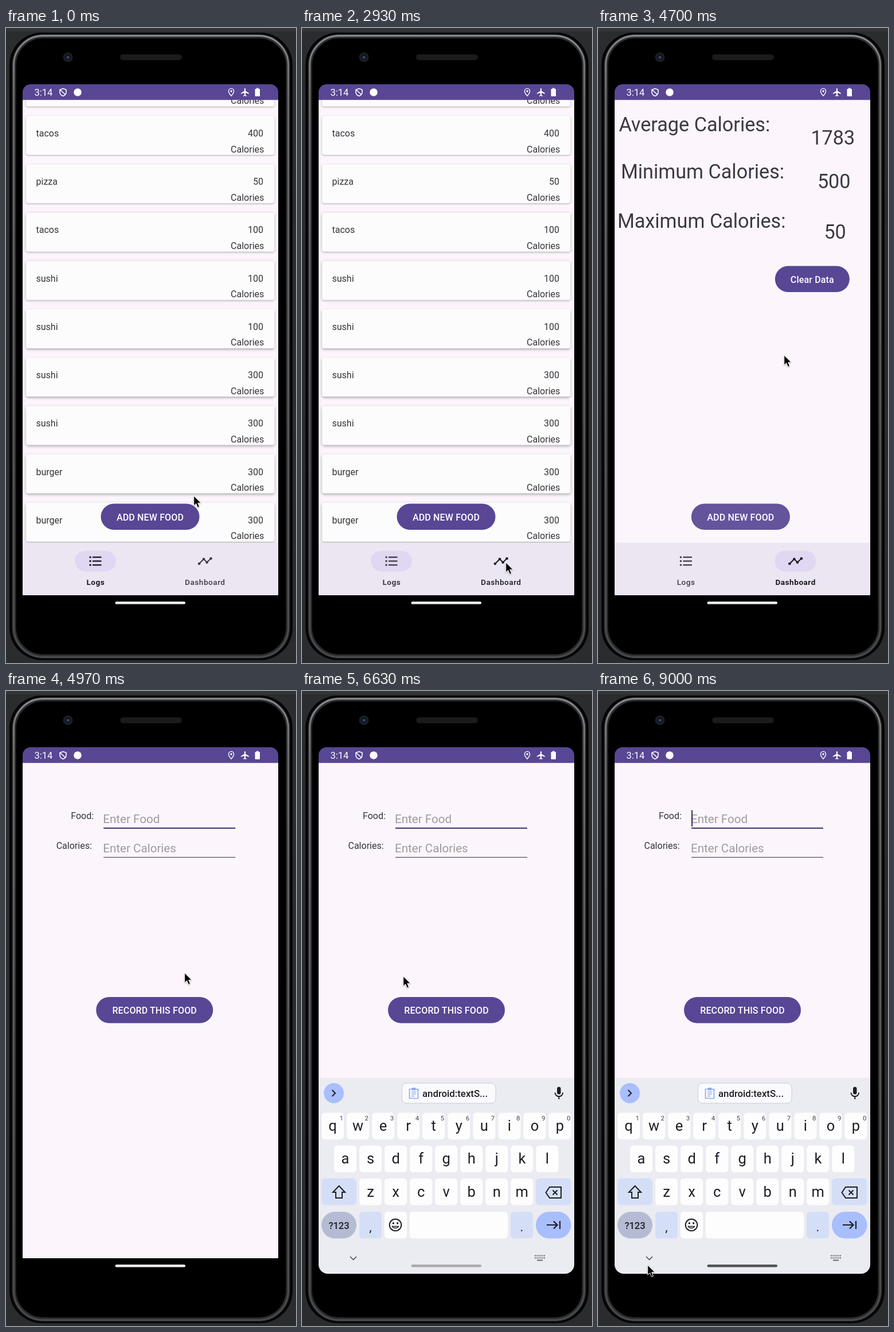
Write an HTML page that moves like this. It is 506 by 1106 pixels and loops after 9030 ms.

```html
<!DOCTYPE html>
<html lang="en">
<head>
<meta charset="utf-8">
<title>Food log</title>
<style>
html, body { margin: 0; width: 100%; height: 100%; overflow: hidden; background: #2b2c2e; }
svg { display: block; font-family: Roboto, "Noto Sans", sans-serif; }
</style>
</head>
<body>
<svg id="stage" width="506" height="1106" viewBox="0 0 506 1106"></svg>
<script>
const LOOP = 9030;
const PURPLE = '#594694', PAGE = '#fcf6fc', INK = '#36333a', ACTIVE = '#1a181d', IDLE = '#3f3c46';

// Markup helpers
const rect = (x, y, w, h, fill, r = 0, extra = '') =>
  `<rect x="${x}" y="${y}" width="${w}" height="${h}" rx="${r}" fill="${fill}" ${extra}/>`;
const dot = (x, y, r, fill, extra = '') => `<circle cx="${x}" cy="${y}" r="${r}" fill="${fill}" ${extra}/>`;
const text = (x, y, size, s, fill = INK, extra = '') =>
  `<text x="${x}" y="${y}" font-size="${size}" fill="${fill}" ${extra}>${s}</text>`;
const line = (d, color, w = 2, extra = '') =>
  `<path d="${d}" fill="none" stroke="${color}" stroke-width="${w}" ${extra}/>`;
const group = (id, body, extra = '') => `<g id="${id}" ${extra}>${body}</g>`;
const MID = 'text-anchor="middle"', END = 'text-anchor="end"', MEDIUM = 'font-weight="500"';

const button = (x, y, w, label, id = '') =>
  rect(x, y, w, 45.5, PURPLE, 22.7) +
  (id && rect(x, y, w, 45.5, '#fff', 22.7, `id="${id}" opacity="0"`)) +
  text(x + w / 2, y + 29, 16, label, '#fff', `${MID} ${MEDIUM} letter-spacing=".15"`);

function phone() {
  return rect(0, 0, 506, 1106, '#2b2c2e') + rect(0, 0, 506, 6, '#343538') +
    rect(6, 8, 494, 1093, '#050505', 56) +
    rect(14, 14.5, 478, 1080, '#000', 51, 'stroke="#2c2d2f" stroke-width="7"') +
    rect(13.5, 13.5, 479, 1082, 'none', 51, 'stroke="url(#rim)" stroke-width="2.8"') +
    dot(108, 51, 8.5, '#1d1e22') + dot(108, 51, 5, '#10131c') + dot(108, 51, 2.6, '#2b4274') +
    rect(199, 46, 108, 10, '#1b1b1b', 5);
}

function statusBar() {
  const plane = 'M22 16v-2l-8.5-5V3.5c0-.83-.67-1.5-1.5-1.5s-1.5.67-1.5 1.5V9L2 14v2l8.5-2.5V19L8 20.5V22l4-1 4 1v-1.5L13.5 19v-5.5z';
  return rect(29, 98, 446, 27.3, PURPLE) +
    text(49.5, 118, 16.5, '3:14', '#fff') +
    line('M99.5 105.5l5.5 2v4.5q0 4.5 -5.5 6.5q-5.5-2-5.5-6.5v-4.5zM95 108l8.5 8', '#fff', 1.6) +
    dot(125, 112, 6.8, '#fff') +
    line('M393 118.3q-4.6-5.3-4.6-8.3a4.6 4.6 0 0 1 9.2 0q0 3-4.6 8.3z', '#fff', 1.4) +
    dot(393, 110, 1.7, '#fff') +
    `<path d="${plane}" fill="#fff" transform="translate(408.5 103.5) scale(.7)"/>` +
    rect(434.5, 106, 8.5, 13, '#fff', 1) + rect(437, 104.5, 3.5, 2, '#fff');
}

function logs() {
  const foods = ['tacos', 'tacos', 'pizza', 'tacos', 'sushi', 'sushi', 'sushi', 'sushi', 'burger', 'burger'];
  const calories = [300, 400, 50, 100, 100, 100, 300, 300, 300, 300];
  return foods.map((food, i) => {
    const y = 153 + 84.22 * (i - 1);
    const shadow = `style="filter:drop-shadow(0 ${1 + i * .2}px ${1.6 + i * .12}px rgba(40,30,50,.38))"`;
    return rect(35, y, 433.5, 68, '#fcfcfc', 4, shadow) +
      text(52.5, y + 36, 16, food) +
      text(449, y + 36, 16, calories[i], INK, END) +
      text(450.3, y + 63.5, 16, 'Calories', INK, END);
  }).join('');
}

function dashboard() {
  const big = (x, y, s) => text(x, y, 34.2, s, '#3d3943');
  return big(39, 180, 'Average Calories:') + big(374, 203, '1783') +
    big(42.5, 262, 'Minimum Calories:') + big(385.5, 279, '500') +
    big(36.5, 348, 'Maximum Calories:') + big(397, 367, '50') +
    button(311.5, 414.5, 130, 'Clear Data');
}

function tabs() {
  const points = [[337, 933], [345, 925], [350.6, 930.7], [357.5, 924]];
  const list = [0, 1, 2].map(i => {
    const y = 921.7 + i * 6.8;
    return dot(147, y, 1.7, 'currentColor') + rect(151, y - 1.15, 15.5, 2.3, 'currentColor');
  }).join('');
  const chart = line('M' + points.join('L'), 'currentColor', 2) +
    points.map(p => dot(...p, 2.3, 'currentColor')).join('');
  const tab = (n, x, label, icon) =>
    rect(-36, 910.5, 72, 36, '#e0d8f3', 18, `id="pill${n}"`) +
    group('tab' + n, icon + text(x + .3, 969.5, 13.6, label, 'currentColor', `${MID} letter-spacing=".5"`));
  return tab(0, 156, 'Logs', list) + tab(1, 347, 'Dashboard', chart);
}

function form() {
  return rect(-30, 125, 570, 863, PAGE) +
    text(106, 223, 16, 'Food:') + text(80.5, 274.5, 16, 'Calories:') +
    text(162, 230, 20.6, 'Enter Food', '#9e9aa0', 'id="hint"') +
    text(162, 281, 20.6, 'Enter Calories', '#9e9aa0') +
    rect(163, 237.7, 230, 2.4, '#57477f') + rect(163, 289, 230, 1.3, '#5b5660') +
    rect(162.8, 207.5, 2.3, 28.5, '#4b4168', 0, 'id="caret"') +
    button(150, 533, 204, 'RECORD THIS FOOD');
}

function keyboard() {
  const dark = '#1d1e24', blue = '#a9befc', pale = '#d4dff7', pitch = 44.05;
  const key = (x, y, w = 39, fill = '#fdfdfe', r = 6) => rect(x, y, w, 46.5, fill, r);
  const row = (letters, x, y) => [...letters].map((c, i) =>
    key(x + i * pitch, y) + text(x + 19.5 + i * pitch, y + 31.5, 25.5, c, dark, MID)).join('');
  const digits = [...'1234567890'].map((d, i) => text(68.8 + i * pitch, 747.5, 11.5, d, '#45464d', MID)).join('');
  return rect(29, 674, 446, 342, '#ebebf2') +
    dot(55.5, 700.5, 17.5, blue) + line('M52.5 695l5.5 5.5l-5.5 5.5', dark) +
    rect(174.5, 683, 163.5, 35, '#fafafd', 8, 'stroke="#c9cad8"') +
    line('M187.5 693.5h15v16h-15zM191 698.5h8M191 702h8M191 705.5h5', '#8eaaf3', 1.7) +
    rect(191.5, 691, 7, 4.5, '#8eaaf3', 1) +
    text(210, 707, 16.8, 'android:textS...', dark, MEDIUM) +
    rect(445, 689.5, 6.5, 13, dark, 3.2) +
    line('M441.5 699.5a6.8 6.8 0 0 0 13.6 0M448.3 706v5', dark) +
    row('qwertyuiop', 34, 734.5) + digits + row('asdfghjkl', 56, 791.7) + row('zxcvbnm', 100, 849) +
    key(34, 849, 61, pale) + line('M64.5 862l10.5 11h-5v10h-11v-10h-5z', dark, 2) +
    key(408, 849, 61.5, pale) + line('M425.5 873.5l6.5-9.5h20v19h-20zM437.5 869.5l8 8m0-8l-8 8', dark, 2) +
    key(34, 907, 61, '#b4bbd3', 23) + text(64.5, 937, 16.5, '?123', dark, `${MID} ${MEDIUM}`) +
    key(100, 907, 39, pale) + text(119.5, 941, 22, ',', dark, MID) +
    key(144, 907) + dot(163, 930, 10.3, 'none', `stroke="${dark}" stroke-width="2"`) +
    dot(159.3, 927, 1.7, dark) + dot(166.7, 927, 1.7, dark) + line('M157.5 932.5a6 5 0 0 0 11 0z', dark, 1.5) +
    key(187.5, 907, 171.5) +
    key(364, 907, 39, pale) + text(383.5, 941, 22, '.', dark, MID) +
    key(408, 907, 61.5, blue, 23) + line('M427 930h18M439 923.5l6.5 6.5l-6.5 6.5M450 923v14', dark, 2.2) +
    line('M84 985l5.5 5.5l5.5-5.5', '#54555c', 1.7) +
    line('M406 983.5h18M406 987.5h18', '#6b6c73', 2, 'stroke-dasharray="2 1.2"') + line('M410 991.5h10', '#6b6c73', 2);
}

const stage = document.getElementById('stage');
stage.innerHTML = `<defs>
  <linearGradient id="rim" x1="0" y1="0" x2="0" y2="1">
    <stop offset="0" stop-color="#8a8b8e"/><stop offset=".1" stop-color="#6c6d70"/><stop offset="1" stop-color="#4a4b4d"/>
  </linearGradient>
  <clipPath id="screen"><path d="M29 112a14 14 0 0 1 14-14h418a14 14 0 0 1 14 14v887a16 16 0 0 1-16 16h-414a16 16 0 0 1-16-16z"/></clipPath>
  <clipPath id="page"><path d="M29 125h446v863h-446z"/></clipPath>
</defs>` +
  phone() +
  group('view',
    group('pages',
      rect(29, 125, 446, 863, PAGE) +
      group('home', group('logs', logs()) + group('dash', dashboard()) +
        rect(-30, 896.5, 570, 92, '#ece6f3') + button(165.5, 828.5, 172, 'ADD NEW FOOD', 'ripple') + tabs()) +
      group('form', form()), 'clip-path="url(#page)"') +
    statusBar() + group('keys', keyboard()), 'clip-path="url(#screen)"') +
  rect(190.5, 999, 122.5, 4.6, '#f1f0ee', 2.3, 'id="handle"') +
  group('cursor', '<path d="M.7 1v17l3.9-3.600l2.800 6.800l3.100-1.300l-2.800-6.600h5.400z" fill="#000" stroke="#fff" stroke-width="1"/>',
    'style="filter:drop-shadow(0 1px 1px rgba(0,0,0,.3))"');

// Motion
const get = id => document.getElementById(id);
const set = (id, name, value) => get(id).setAttribute(name, value);
const show = (id, on) => set(id, 'visibility', on ? 'visible' : 'hidden');
const lin = (t, a, b) => Math.min(1, Math.max(0, (t - a) / (b - a)));
const ease = (t, a, b) => { const p = lin(t, a, b); return p * p * (3 - 2 * p); };

const TAP_TAB = 2910, SWAP = 2960, OPEN = 4635, FOCUS = 5870;
const path = [
  [0, 327, 814], [250, 327, 814], [1000, 356, 931], [2800, 356, 931], [2930, 355, 930], [3500, 355, 930],
  [4200, 320, 850], [4480, 320, 850], [4700, 324, 569], [5600, 264, 206], [6050, 264, 206],
  [6630, 176, 496], [7400, 86, 999], [LOOP, 86, 999]
];

function pointer(t) {
  const i = path.findIndex(p => p[0] > t);
  const [a, x, y] = path[i - 1], [b, u, v] = path[i];
  const p = ease(t, a, b);
  return [x + (u - x) * p, y + (v - y) * p];
}

function drawTab(n, x, amount, active, bold) {
  set('pill' + n, 'transform', `translate(${x} 0) scale(${.4 + .6 * amount} 1)`);
  set('pill' + n, 'opacity', amount);
  set('tab' + n, 'color', active ? ACTIVE : IDLE);
  set('tab' + n, 'font-weight', bold ? 700 : 500);
}

function draw(t) {
  const swapped = t >= SWAP, tapped = t >= TAP_TAB;
  const pill = ease(t, SWAP, SWAP + 250);
  show('logs', !swapped);
  show('dash', swapped);
  drawTab(0, 156, 1 - pill, !tapped, !swapped);
  drawTab(1, 347, pill, tapped, swapped);
  set('ripple', 'opacity', .07 * lin(t, 4440, 4560));

  const slide = ease(t, OPEN, OPEN + 450);
  set('home', 'transform', `translate(${-45 * slide} 0)`);
  set('form', 'transform', `translate(${45 * (1 - slide)} 0)`);
  set('form', 'opacity', lin(t, OPEN + 70, OPEN + 155));

  show('caret', t >= FOCUS && (t - FOCUS) % 1000 < 500);
  set('hint', 'fill', t >= FOCUS && t < FOCUS + 130 ? '#69646c' : '#9e9aa0');
  const rise = 1 - (1 - lin(t, 6050, 6330)) ** 3;
  show('keys', rise > 0);
  set('keys', 'transform', `translate(0 ${342 * (1 - rise)})`);
  const tone = 240 - 156 * ease(t, 6400, 6900);
  set('handle', 'fill', `rgb(${tone},${tone},${tone})`);

  set('cursor', 'transform', `translate(${pointer(t)})`);
}

const start = performance.now();
function tick() {
  draw((performance.now() - start) % LOOP);
  requestAnimationFrame(tick);
}
tick();
</script>
</body>
</html>
```
